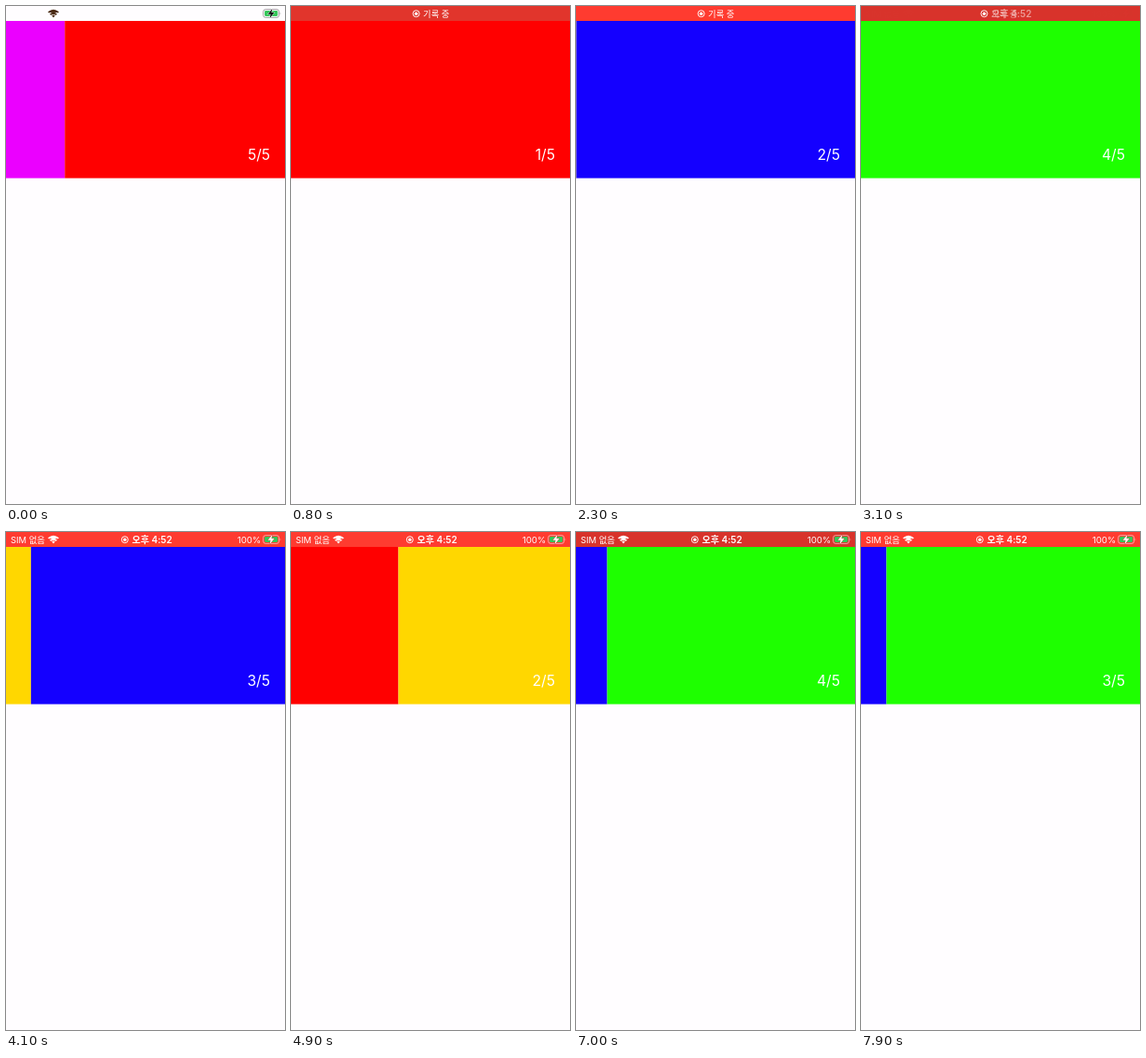
Write an HTML page that moves like this. It is 300 px wide and 534 px high and loops after 8 s.

```html
<!DOCTYPE html>
<html lang="ko">
<head>
<meta charset="utf-8">
<title>Carousel</title>
<style>
  html, body { margin: 0; width: 100%; height: 100%; overflow: hidden; background: #fffdff; }
  svg { display: block; width: 100vw; height: 100vh; }
  text { font-family: Inter, "Noto Sans CJK KR", "Noto Sans CJK", sans-serif; fill: #fff; }
  .bar { font-size: 9.6px; }
</style>
</head>
<body>
<svg viewBox="0 0 300 534">
  <rect width="300" height="534" fill="#fffdff"/>
  <rect id="left" y="16" width="300" height="168.6"/>
  <rect id="right" y="16" width="300" height="168.6"/>
  <text id="counter" x="284" y="165" text-anchor="end" font-size="15.6"></text>

  <rect id="statusBar" width="300" height="16"/>
  <g id="sides" class="bar">
    <g id="labels">
      <text x="5" y="11.7" font-size="9.4">SIM 없음</text>
      <text x="274.3" y="11.7" text-anchor="end">100%</text>
    </g>
    <g id="wifi" fill="none" stroke-width="1.7">
      <path d="M45.6 6.9Q51 2.2 56.4 6.9"/>
      <path d="M47.6 9.2Q51 6.3 54.4 9.2"/>
      <path d="M49.2 10.3Q51 9 52.8 10.3L51 12.4Z" stroke="none"/>
    </g>
    <g id="battery">
      <rect x="276.6" y="3.6" width="17" height="8.8" rx="2.6" fill="none" stroke-width=".9" stroke-opacity=".6"/>
      <path d="M294.7 6.4q1.3 1.6 0 3.2z" fill-opacity=".6" stroke="none"/>
      <rect x="278" y="5" width="14.2" height="6" rx="1.4" fill="#34c759" stroke="none"/>
      <path id="bolt" d="M286.5 2.8L281.6 8.7H284.6L283.5 13.2L288.5 7.1H285.4Z" stroke-width=".9" paint-order="stroke"/>
    </g>
  </g>
  <g id="center">
    <g id="record">
      <circle cy="8.2" r="3.5" fill="none" stroke="#fff" stroke-width=".95"/>
      <circle cy="8.2" r="1.75" fill="#fff"/>
    </g>
    <text id="recording" y="11.7" font-size="9.3">기록 중</text>
    <text id="clock" y="11.8" font-size="10" font-weight="600">오후 4:52</text>
  </g>
</svg>
<script>
const LOOP = 8000, WIDTH = 300, SWIPE = 550;
const COLORS = ['#ff0000', '#ffd700', '#1400ff', '#1eff00', '#eb00ff'];
const FIRST_PAGE = -1;
// [start time, direction]
const SWIPES = [
  [-300, 1], [1120, 1], [1790, 1], [2450, 1],
  [3322, -1], [4047, -1], [4746, -1], [5444, -1], [6191, -1], [6938, -1],
  [7532, 1]
];
const PULSES = [1050, 3100, 7000];
const PULSE_WIDTH = 800;

const el = id => document.getElementById(id);
const set = (id, attrs) => {
  for (const name in attrs) el(id).setAttribute(name, attrs[name]);
};
const clamp = x => Math.min(1, Math.max(0, x));
const ramp = (t, from, to) => clamp((t - from) / (to - from));
const mix = (a, b, p) => a.map((v, i) => Math.round(v + (b[i] - v) * p));
const rgb = c => `rgb(${c.join(',')})`;
const wrap = i => ((i % 5) + 5) % 5;
const swipeEase = u => 1 - (1 - u ** 1.5) ** 3;

function drawCarousel(t) {
  let position = FIRST_PAGE, settled = FIRST_PAGE;
  for (const [start, direction] of SWIPES) {
    const u = clamp((t - start) / SWIPE);
    position += direction * swipeEase(u);
    if (u === 1) settled += direction;
  }
  const page = Math.floor(position + 1e-6);
  const split = WIDTH * (1 - (position - page));
  set('left', { x: split - WIDTH, fill: COLORS[wrap(page)] });
  set('right', { x: split, fill: COLORS[wrap(page + 1)] });
  el('counter').textContent = `${wrap(settled) + 1}/5`;
}

function drawStatusBar(t) {
  const dim = Math.max(...PULSES.map(p => {
    const d = Math.min(1, Math.abs(t - p) / PULSE_WIDTH);
    return (1 + Math.cos(Math.PI * d)) / 2;
  }));
  const red = mix([255, 59, 48], [216, 51, 43], dim);
  const tint = ramp(t, 50, 400);
  set('statusBar', { fill: rgb(mix([255, 253, 255], red, tint)) });

  const early = t < 1500;
  const ink = early ? '#4a2a14' : '#fff';
  set('sides', { opacity: early ? 1 - tint : ramp(t, 3100, 3400) });
  set('labels', { opacity: early ? 0 : 1 });
  set('wifi', { stroke: ink, fill: ink });
  el('wifi').lastElementChild.setAttribute('fill', ink);
  set('battery', { stroke: early ? '#555' : '#fff', fill: early ? '#555' : '#fff' });
  set('bolt', { fill: early ? '#111' : '#fff', stroke: early ? '#fff' : '#c5483c' });

  const swap = ramp(t, 3000, 3320);
  const x = 134.6 - 6.8 * swap;
  set('center', { opacity: tint });
  set('record', { transform: `translate(${x} 0)` });
  set('recording', { x: x + 7.5, opacity: 1 - ramp(t, 2950, 3250) });
  set('clock', { x: x + 7.8, opacity: ramp(t, 2950, 3250) });
}

function frame(now) {
  const t = now % LOOP;
  drawCarousel(t);
  drawStatusBar(t);
  requestAnimationFrame(frame);
}

const origin = performance.now();
const tick = now => frame(Math.max(0, now - origin));
function frameAt() {
  const t = (performance.now() - origin) % LOOP;
  drawCarousel(t);
  drawStatusBar(t);
  requestAnimationFrame(frameAt);
}
frameAt();
</script>
</body>
</html>
```
